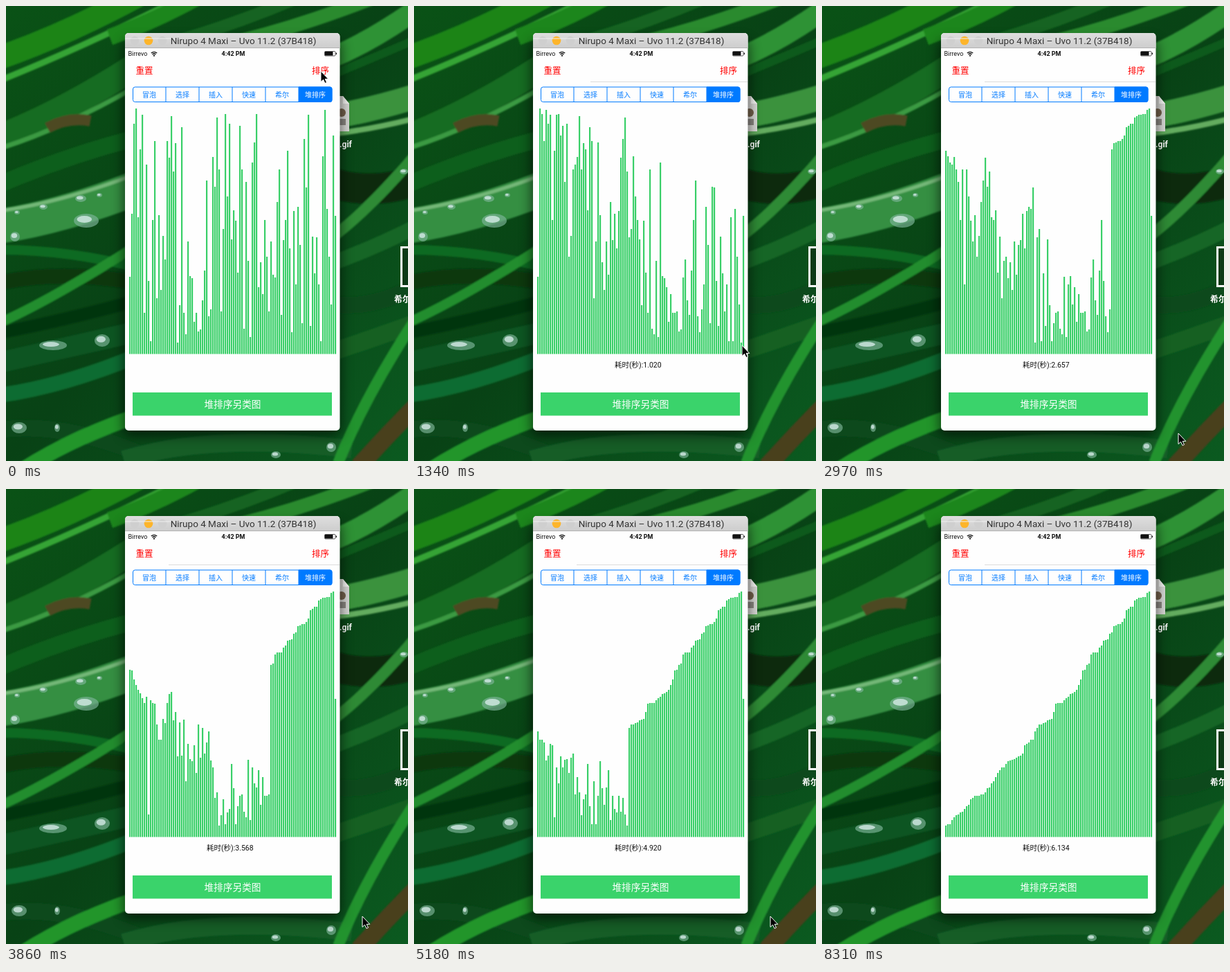
These frames come from a looping animation (581x657 px, 9.05 s). An HTML page:

```html
<!DOCTYPE html>
<html lang="zh-CN">
<head>
<meta charset="utf-8">
<title>堆排序</title>
<style>
  html, body { margin: 0; width: 100%; height: 100%; overflow: hidden; background: #0a4a18; }
  svg { display: block; width: 581px; height: 657px; }
  text { font-family: Roboto, "Noto Sans CJK SC", "Noto Sans CJK", sans-serif; text-anchor: middle; }
  .cjk { font-family: "Noto Sans CJK SC", "Noto Sans CJK", sans-serif; }
</style>
</head>
<body>
<svg viewBox="0 0 581 657">
  <defs>
    <linearGradient id="base" x1="0" y1="0" x2="1" y2="1">
      <stop offset="0" stop-color="#0a5216"/>
      <stop offset=".5" stop-color="#084215"/>
      <stop offset="1" stop-color="#0b5a20"/>
    </linearGradient>
    <linearGradient id="bar" x2="0" y2="1">
      <stop offset="0" stop-color="#dedede"/>
      <stop offset="1" stop-color="#cdcdcd"/>
    </linearGradient>
    <filter id="soft"><feGaussianBlur stdDeviation="1.2"/></filter>
    <filter id="haze" x="-50%" y="-50%" width="200%" height="200%"><feGaussianBlur stdDeviation="9"/></filter>
  </defs>

  <rect width="581" height="657" fill="url(#base)"/>
  <g id="grass" fill="none" filter="url(#soft)"></g>
  <g id="drops"></g>

  <!-- desktop icons -->
  <path d="M470 130h17l9 11v40h-26z" fill="#d9d9d6"/>
  <path d="M487 130v11h9z" fill="#f6f6f4"/>
  <circle cx="485" cy="154" r="6" fill="#75624c"/>
  <path d="M482 163h9v9h-9z" fill="#8d8a84"/>
  <text x="491" y="204" font-size="12" font-weight="700" fill="#fff">.gif</text>
  <rect x="571.5" y="348.500" width="40" height="56" fill="#0c3a16" stroke="#fff" stroke-width="3"/>
  <text class="cjk" x="573" y="428" font-size="12" font-weight="700" fill="#fff">希尔</text>

  <!-- simulator window -->
  <rect x="170" y="50" width="314" height="570" rx="6" opacity=".6" filter="url(#haze)"/>
  <rect x="172" y="39" width="310.500" height="574" rx="5" fill="#fefefe"/>
  <path d="M172 61V44a5 5 0 0 1 5-5h300.500a5 5 0 0 1 5 5v17z" fill="url(#bar)"/>
  <path d="M172 60.500h310.500" stroke="#b3b3b3"/>
  <circle cx="186" cy="50" r="6.300" fill="#cfcfcf"/>
  <circle cx="206" cy="50" r="6.300" fill="#fdb52b"/>
  <circle cx="226" cy="50" r="6.300" fill="#cfcfcf"/>
  <path d="M172 47h69" stroke="#eee" stroke-width="1.500" opacity=".7"/>
  <text x="343" y="55" font-size="13.500" fill="#333">Nirupo 4 Maxi – Uvo 11.2 (37B418)</text>

  <!-- status bar -->
  <text x="190.500" y="72" font-size="9" fill="#111">Birrevo</text>
  <g fill="none" stroke="#111" stroke-width="1.300">
    <path d="M209.800 68a6 6 0 0 1 8.400 0M211.500 70a3.600 3.600 0 0 1 5 0"/>
    <circle cx="214" cy="71.700" r=".5"/>
  </g>
  <text x="328.500" y="72" font-size="9" font-weight="700" fill="#111">4:42 PM</text>
  <rect x="460.500" y="65.500" width="15.500" height="6.500" rx="1.200" fill="none" stroke="#111" stroke-width=".7"/>
  <path d="M461 66h11.500v5.500h-11.500zM476.800 67.500h1.200v2.500h-1.200z" fill="#111"/>

  <path id="rule" stroke="#dcdcdc"/>
  <g class="cjk" font-size="12.500" fill="#f00">
    <text class="cjk" x="200" y="97.500">重置</text>
    <text class="cjk" x="454.500" y="97.500">排序</text>
  </g>
  <g id="tabs" font-size="10"></g>

  <path id="bars" fill="#39cf68"/>
  <text id="clock" x="290" y="521.500" font-size="10.500" fill="#111" style="text-anchor:start"></text>
  <rect x="183" y="558" width="288" height="33.500" fill="#3ad36b"/>
  <text class="cjk" x="327.500" y="580" font-size="13.700" font-weight="300" fill="#fff">堆排序另类图</text>

  <path id="cursor" d="M0 0V15.500L3.600 12.300L6 17.500L8.500 16.400L6.200 11.400H10.800Z" stroke="#fff"/>
</svg>

<script>
const LOOP = 9050;
const $ = id => document.getElementById(id);

function add(parent, tag, attrs, text = '') {
  const el = document.createElementNS('http://www.w3.org/2000/svg', tag);
  for (const k in attrs) el.setAttribute(k, attrs[k]);
  el.textContent = text;
  parent.append(el);
  return el;
}

// Backdrop: path, width, colour
const blades = [
  ['M-10 75Q90 40 200-20', 34, '#1a8419'],
  ['M-10 108Q110 60 250-10', 9, '#36a434'],
  ['M150 45Q220 20 290-20', 24, '#1f861f'],
  ['M250 50Q350 20 440-20', 18, '#136420'],
  ['M340 50Q460 20 600-40', 20, '#2a8a2e'],
  ['M470 75Q530 50 600 0', 30, '#2f9236'],
  ['M470 100Q530 75 600 45', 12, '#0d5a1c'],
  ['M-10 190Q80 155 185 88', 38, '#186c24'],
  ['M-10 206Q80 178 185 118', 7, '#3b9a42'],
  ['M60 176Q90 160 122 166', 16, '#4e4a22'],
  ['M-10 258Q90 215 190 190', 24, '#0f5e1e'],
  ['M-10 318Q80 305 190 262', 50, '#358f43'],
  ['M-10 296Q80 284 190 242', 5, '#74b878'],
  ['M-10 352Q90 352 190 378', 14, '#0f6a22'],
  ['M-10 400Q80 380 190 400', 22, '#07380f'],
  ['M-10 458Q70 422 190 345', 14, '#238d2d'],
  ['M-10 472Q80 455 190 425', 18, '#06360f'],
  ['M-10 515Q80 495 190 470', 30, '#0d5524'],
  ['M-10 562Q80 550 190 505', 22, '#106c30'],
  ['M-10 612Q80 600 190 645', 24, '#0a4a1e'],
  ['M20 672Q100 620 210 585', 22, '#22952b'],
  ['M170 655Q300 615 500 640', 26, '#125d28'],
  ['M470 160Q530 150 600 128', 36, '#3b923e'],
  ['M470 185Q530 178 600 160', 8, '#64ac5e'],
  ['M470 255Q530 275 600 250', 44, '#082c0c'],
  ['M470 335Q530 290 600 205', 16, '#2d8a35'],
  ['M470 372Q530 350 600 315', 22, '#156626'],
  ['M470 430Q530 440 600 400', 24, '#0a4a1b'],
  ['M470 500Q530 480 600 455', 26, '#126024'],
  ['M480 660Q520 560 600 440', 16, '#24932f'],
  ['M510 665Q550 620 600 570', 26, '#483f1c'],
];
for (const [d, w, stroke] of blades) add($('grass'), 'path', { d, stroke, 'stroke-width': w });

// Dew: x, y, rx, ry
const dew = [
  [116, 310, 18, 10], [13, 333, 7, 7], [54, 290, 6, 4], [108, 278, 8, 5], [16, 298, 4, 3],
  [135, 273, 4, 3], [68, 490, 20, 7], [139, 483, 11, 9], [19, 609, 11, 8], [74, 609, 4, 6],
  [390, 648, 7, 5], [470, 637, 7, 7], [575, 239, 6, 4],
];
for (const [cx, cy, rx, ry] of dew) {
  add($('drops'), 'ellipse', { cx, cy, rx, ry, fill: '#7fb69a', opacity: .65 });
  add($('drops'), 'ellipse', { cx: cx - rx * .15, cy: cy - ry * .2, rx: rx * .6, ry: ry * .5, fill: '#dcefee', opacity: .75 });
}

// Segmented control
const tabs = $('tabs'), blue = '#007aff';
add(tabs, 'rect', { x: 183.5, y: 117, width: 287.5, height: 21.5, rx: 3, fill: '#fefefe', stroke: blue });
add(tabs, 'path', { d: 'M423 116.500h45a3.500 3.500 0 0 1 3.500 3.500v15.500a3.500 3.500 0 0 1-3.500 3.500h-45z', fill: blue });
['冒泡', '选择', '插入', '快速', '希尔', '堆排序'].forEach((name, i) => {
  if (i) add(tabs, 'path', { d: `M${183 + 48 * i} 117v21.500`, stroke: blue });
  add(tabs, 'text', { class: 'cjk', x: 207 + 48 * i, y: 131.5, fill: i < 5 ? blue : '#fff' }, name);
});

// Top edge of each bar; a smaller value is a taller bar
const tops = [
  391, 300, 170, 148, 305, 207, 157, 443, 229, 397, 484, 309, 195, 422, 302, 410, 332, 366, 195, 219,
  159, 239, 198, 486, 432, 175, 443, 474, 340, 390, 393, 456, 443, 470, 467, 425, 382, 252, 448, 438,
  218, 261, 161, 236, 441, 322, 156, 275, 170, 337, 295, 310, 385, 173, 236, 466, 254, 368, 478, 226,
  197, 156, 406, 370, 416, 309, 362, 441, 340, 388, 392, 283, 236, 446, 338, 309, 209, 350, 471, 296,
  402, 290, 345, 458, 192, 262, 157, 462, 333, 386, 334, 402, 484, 217, 150, 293, 362, 431, 187, 303,
];

// Heap sort that leaves the last bar out; every swap is logged
const swaps = [], built = [], popped = [];
function swap(list, i, j) { [list[i], list[j]] = [list[j], list[i]]; }

function heapSort(list, size) {
  const move = (i, j) => { swap(list, i, j); swaps.push([i, j]); };
  const sift = (i, n) => {
    for (let c; (c = 2 * i + 1) < n; i = c) {
      if (c + 1 < n && list[c + 1] < list[c]) c++;
      if (list[i] <= list[c]) return;
      move(i, c);
    }
  };
  for (let i = (size >> 1) - 1; i >= 0; i--) {
    sift(i, size);
    built[i] = swaps.length;
  }
  for (let end = size - 1; end > 0; end--) {
    move(0, end);
    popped[size - end] = swaps.length;
    sift(0, end);
  }
}
heapSort([...tops], tops.length - 1);

// time, seconds on the label, swaps done
const progress = [
  [326, 0, 0],
  [740, .414, built[25]],
  [2080, 1.767, popped[7] + 3],
  [3860, 3.568, popped[31] + 3],
  [5180, 4.920, popped[55] + 3],
  [6230, 5.971, popped[86] + 1],
  [6380, 6.121, popped[96]],
  [6530, 6.134, swaps.length],
];

// time, x, y
const pointer = [
  [0, 455, 94], [140, 457, 95], [290, 457, 95], [440, 459, 101], [740, 462, 117],
  [1040, 468, 250], [1340, 474, 490], [1640, 500, 595], [2080, 510, 616], [2670, 514, 618],
  [2820, 515, 617], [6830, 515, 617], [6980, 500, 604], [7280, 450, 582], [7430, 426, 580],
  [7580, 440, 588], [7880, 500, 625], [8010, 512, 631], [8160, 518, 641],
];

function at(table, t) {
  const k = table.findIndex(row => row[0] > t);
  if (k < 1) return table[k < 0 ? table.length - 1 : 0].slice(1);
  const a = table[k - 1], b = table[k], f = (t - a[0]) / (b[0] - a[0]);
  return a.slice(1).map((v, i) => v + (b[i + 1] - v) * f);
}

// The picture holds between ticks: first, last, count
const ticks = [
  [0, 0, 1], [140, 140, 1], [440, 1340, 7], [1490, 2530, 8], [2670, 3710, 8], [3860, 4890, 8],
  [5040, 6080, 8], [6230, 6530, 3], [6980, 8010, 8], [8160, 8310, 2],
].flatMap(([a, b, n]) =>
  Array.from({ length: n }, (_, i) => n > 1 ? Math.floor((a + (b - a) * i / (n - 1)) / 10) * 10 : a));

function draw(t) {
  const [seconds, done] = at(progress, t);
  const list = [...tops];
  for (const [i, j] of swaps.slice(0, Math.round(done))) swap(list, i, j);
  $('bars').setAttribute('d', list.map((y, i) => `M${178 + 3 * i} ${y}h2.200V502.500h-2.200z`).join(''));
  $('clock').textContent = t < 440 ? '' : `耗时(秒):${seconds.toFixed(3)}`;
  $('rule').setAttribute('d', t < 440 ? '' : `M${t < 1490 ? 255 : 235} 109.500H482`);
  const [x, y] = at(pointer, t);
  $('cursor').setAttribute('transform', `translate(${x} ${y})`);
  $('cursor').style.display = t < 8310 ? '' : 'none';
}

const start = performance.now();
let shown = -1;
function frame() {
  const t = (performance.now() - start) % LOOP;
  const tick = ticks.findLast(v => v <= t) ?? 0;
  if (tick !== shown) draw(shown = tick);
  requestAnimationFrame(frame);
}
frame();
</script>
</body>
</html>
```
